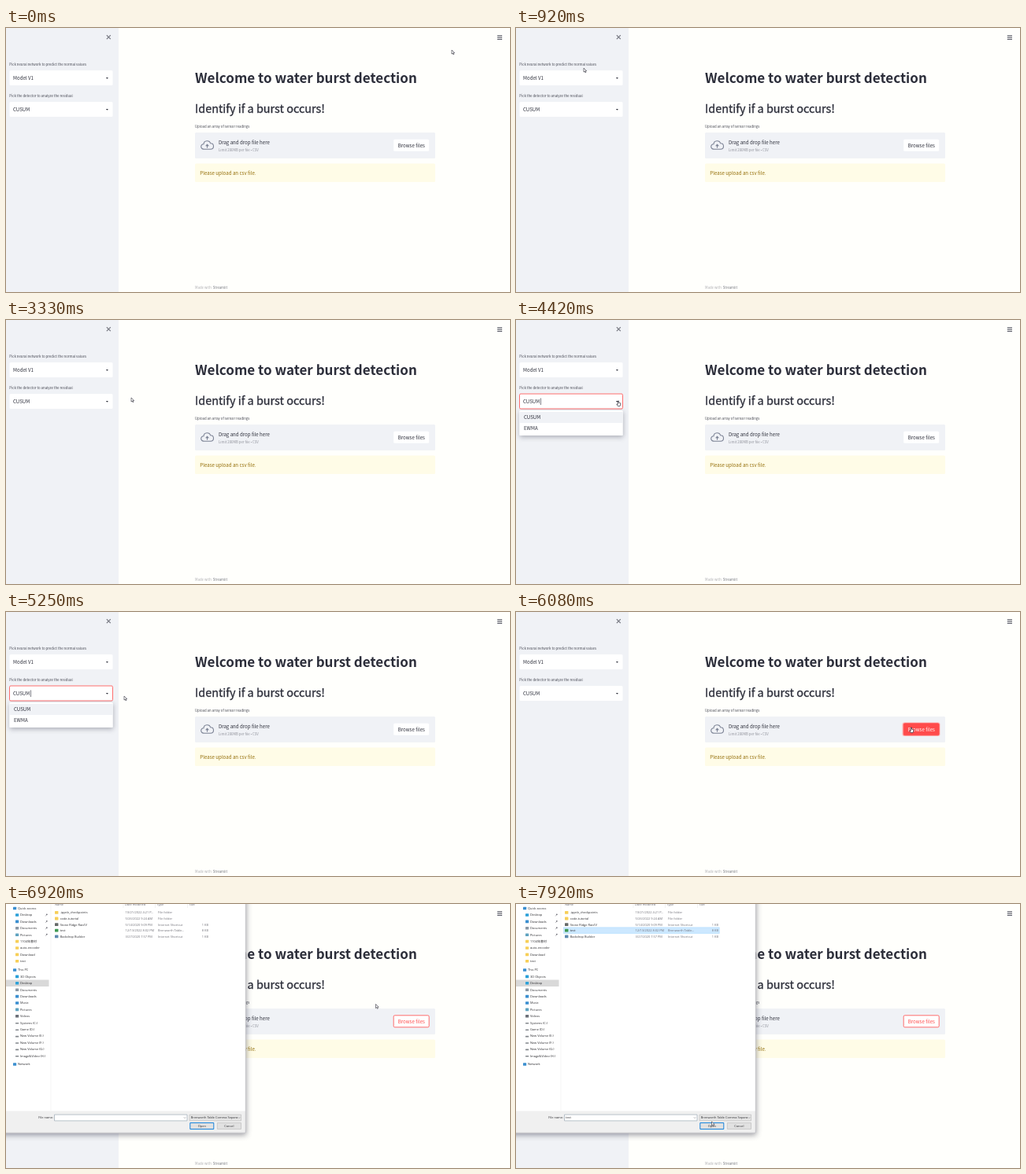
An HTML page with a canvas for the animation above (8 s loop, 640 by 336 pixels).

```html
<!DOCTYPE html>
<html lang="en">
<head>
<meta charset="utf-8">
<title>Water burst detection</title>
<style>
html, body { margin: 0; width: 100%; height: 100%; overflow: hidden; background: #fffffc; }
canvas { display: block; width: 640px; height: 336px; }
</style>
</head>
<body>
<canvas id="stage"></canvas>
<script>
const canvas = document.getElementById('stage');
const ctx = canvas.getContext('2d');
const ratio = window.devicePixelRatio || 1;
canvas.width = 640 * ratio;
canvas.height = 336 * ratio;

const LOOP = 8000;
const BEATS = [0, 80, 250, 330, 420];
const SANS = '"Noto Sans CJK JP", "Noto Sans CJK SC", "Noto Sans CJK", sans-serif';
const UI = '"Open Sans", "Noto Sans CJK JP", sans-serif';
const PAGE = '#fffffc', PANEL = '#f0f2f6', WHITE = '#ffffff', INK = '#2b2d39', RED = '#ff4b4b';
const LABEL = '#484a55', SLATE = '#7b8294';

// Cursor stops: time, x, y of the tip
const PATH = [
  [0, 566, 28], [250, 566, 28], [920, 86, 51], [1080, 126, 62], [1580, 128, 62],
  [2580, 128, 62], [3250, 159, 98], [3420, 159, 100], [4080, 130, 103], [5080, 130, 103],
  [5250, 150, 107], [5580, 456, 149], [5920, 502, 147], [6250, 502, 147], [6580, 469.5, 127.5],
  [7250, 469.5, 127.5], [7580, 88, 34], [7750, 90, 36], [7920, 248.5, 277], [8000, 248.5, 277]
];

function cursorAt(t) {
  let i = 1;
  while (PATH[i][0] < t) i++;
  const [t0, x0, y0] = PATH[i - 1], [t1, x1, y1] = PATH[i];
  const k = (t - t0) / (t1 - t0);
  const e = k * k * (3 - 2 * k);
  return [x0 + (x1 - x0) * e, y0 + (y1 - y0) * e];
}

function rect(x, y, w, h, fill, r = 0, stroke, lw = 0.8) {
  ctx.beginPath();
  ctx.roundRect(x, y, w, h, r);
  if (fill) { ctx.fillStyle = fill; ctx.fill(); }
  if (stroke) { ctx.strokeStyle = stroke; ctx.lineWidth = lw; ctx.stroke(); }
}

// y is the middle of the capital letters
function text(s, x, y, size, color = INK, opt = {}) {
  const base = y + size * 0.365;
  ctx.font = `${opt.weight || 400} ${size}px ${opt.font || SANS}`;
  ctx.textAlign = opt.align || 'left';
  ctx.fillStyle = color;
  ctx.fillText(s, x, base);
  if (opt.thicken) {
    ctx.strokeStyle = color;
    ctx.lineWidth = opt.thicken;
    ctx.strokeText(s, x, base);
  }
}

function line(points, color, lw = 0.8) {
  ctx.beginPath();
  points.forEach(([x, y]) => ctx.lineTo(x, y));
  ctx.strokeStyle = color;
  ctx.lineWidth = lw;
  ctx.stroke();
}

function poly(points, fill, stroke, lw = 0.6) {
  ctx.beginPath();
  points.forEach(([x, y]) => ctx.lineTo(x, y));
  ctx.closePath();
  ctx.fillStyle = fill;
  ctx.fill();
  if (stroke) { ctx.strokeStyle = stroke; ctx.lineWidth = lw; ctx.stroke(); }
}

// Shadow around a box only, so a translucent box stays clean
function dropShadow(x, y, w, h, blur, color) {
  ctx.save();
  ctx.beginPath();
  ctx.rect(-200, -200, 1000, 800);
  ctx.rect(x, y, w, h);
  ctx.clip('evenodd');
  ctx.shadowBlur = blur * ratio;
  ctx.shadowOffsetY = 2 * ratio;
  ctx.shadowColor = color;
  rect(x, y, w, h, WHITE);
  ctx.restore();
}

function select(value, y, open, caret) {
  rect(4.5, y, 131, 19, WHITE, 1.5, open ? RED : null);
  text(value, 9, y + 9.8, 6.12);
  poly([[126.9, y + 9], [129.9, y + 9], [128.4, y + 10.8]], INK);
  if (open && caret) line([[31.5, y + 5.5], [31.5, y + 14]], INK, 0.6);
}

function menu(items, y) {
  const h = items.length * 14 + 4;
  dropShadow(4.5, y, 131, h, 6, 'rgba(40,42,60,.35)');
  rect(4.5, y, 131, h, WHITE, 1.5);
  rect(4.5, y + 2, 131, 14, PANEL);
  items.forEach((s, i) => text(s, 10, y + 9 + i * 14, 6.12));
}

function cloud() {
  ctx.beginPath();
  ctx.moveTo(252, 154.3);
  ctx.bezierCurveTo(246.5, 154.3, 246.5, 148, 251, 147.8);
  ctx.bezierCurveTo(251.3, 142.6, 258.5, 142.6, 259.6, 146.8);
  ctx.bezierCurveTo(264.8, 146.8, 264.8, 154.3, 259.6, 154.3);
  ctx.closePath();
  ctx.strokeStyle = SLATE;
  ctx.lineWidth = 1.1;
  ctx.stroke();
  line([[255.5, 152.6], [255.5, 149]], SLATE, 1.1);
  poly([[253, 150.3], [255.5, 147.6], [258, 150.3]], SLATE);
}

function browse(t) {
  const hot = t >= 5750, down = t >= 5920 && t < 6250;
  if (down) rect(490.5, 140.5, 48, 17.5, '#ffb4b4', 2.5);
  rect(492.2, 141.8, 45, 15, down ? RED : WHITE, 1.5, hot ? RED : null, 0.8);
  text('Browse files', 514.8, 149.4, 6.12, down ? WHITE : hot ? RED : INK, { align: 'center' });
}

function page(t) {
  rect(0, 0, 640, 336, PAGE);
  rect(0, 0, 143, 336, PANEL);
  line([[127.8, 9.2], [132.8, 14.2]], '#777982', 1.2);
  line([[132.8, 9.2], [127.8, 14.2]], '#777982', 1.2);
  for (let y = 9.8; y < 15; y += 2.3) line([[623.8, y], [630, y]], '#555762', 1.1);

  const first = t >= 1830 && t < 3330, second = t >= 4250 && t < 5330;
  const caret = (t - (first ? 1830 : 4250)) % 1000 < 500;
  text('Pick neural network to predict the normal values', 4.3, 46.5, 4.34, LABEL);
  text('Pick the detector to analyze the residual', 4.3, 86, 4.34, LABEL);
  select('Model V1', 54, first, caret);
  select('CUSUM', 94, second, caret);

  text('Welcome to water burst detection', 240, 63.5, 17.02, INK, { weight: 700 });
  text('Identify if a burst occurs!', 240, 102.3, 14.42, INK, { thicken: 0.3 });
  text('Upload an array of sensor readings', 240, 125.2, 4.3, LABEL);
  rect(240, 133, 305, 33, PANEL, 1.5);
  cloud();
  text('Drag and drop file here', 270, 145.8, 6.12);
  text('Limit 200MB per file • CSV', 270, 155.4, 4.32, '#8f919a');
  browse(t);
  rect(240, 172.5, 305, 23.5, '#fffce7', 1.5);
  text('Please upload an csv file.', 246.3, 184.6, 6.15, '#926c05');
  text('Made with ', 240, 330.2, 4.3, '#adadb2');
  text('Streamlit', 262.7, 330.2, 4.3, '#777982');

  if (first) menu(['Model V1', 'Model V2', 'Model V3'], 75);
  if (second) menu(['CUSUM', 'EWMA'], 115);
}

const FOLDER = '#f7cf58', DISK = '#83878c', BLUE = '#3b8fd0';
const PLACES = [
  ['Quick access', 5.5, BLUE], ['Desktop', 14, '#2ba0d8'], ['Downloads', 22.4, BLUE],
  ['Documents', 30.8, '#8b98a5'], ['Pictures', 39.2, '#5fa3c0'], ['1104年書材', 47.6, FOLDER],
  ['auto-encoder', 56, FOLDER], ['Download', 64.4, FOLDER], ['test', 72.8, FOLDER],
  ['This PC', 84, BLUE], ['3D Objects', 92.4, '#2ba0d8'], ['Desktop', 100.8, '#2ba0d8'],
  ['Documents', 109.2, '#8b98a5'], ['Downloads', 117.6, BLUE], ['Music', 126, BLUE],
  ['Pictures', 134.4, '#5fa3c0'], ['Videos', 142.8, '#6c7078'], ['Systems (C:)', 151.2, DISK],
  ['Game (D:)', 159.6, DISK], ['New Volume (E:)', 168, DISK], ['New Volume (F:)', 176.4, DISK],
  ['New Volume (G:)', 184.8, DISK], ['Image&Video (H:)', 193.2, DISK], ['Network', 204, BLUE]
];
const FILES = [
  ['.ipynb_checkpoints', '10/21/2022 4:21 P...', 'File folder', '', FOLDER],
  ['code-tutorial', '5/26/2022 9:24 AM', 'File folder', '', FOLDER],
  ['Stone Ridge Raid V', '5/14/2020 9:09 PM', 'Internet Shortcut', '1 KB', '#666a68'],
  ['test', '12/13/2022 8:02 PM', 'Brenworth Table...', '8 KB', '#3f9a52'],
  ['Backdrop Builder', '3/27/2020 7:57 PM', 'Internet Shortcut', '1 KB', '#5d8ab0']
];

function small(s, x, y, color = '#2c2c30', align = 'left') {
  text(s, x, y, 3.95, color, { font: UI, align });
}

function chevron(x, y) {
  line([[x - 1.2, y - 0.6], [x, y + 0.6], [x + 1.2, y - 0.6]], '#66666c', 0.5);
}

function dialog(t) {
  const hover = t >= 7500, picked = t >= 7580, gray = '#707078';
  ctx.save();
  if (t < 6750) {
    const size = 0.986;
    ctx.globalAlpha = t < 6580 ? 0.5 : 0.84;
    ctx.translate(95 * (1 - size), 76 * (1 - size));
    ctx.scale(size, size);
  }
  dropShadow(-100, -140, 404.5, 431.5, 7, 'rgba(30,30,50,.45)');
  rect(-100, -140, 404.5, 431.5, WHITE);
  rect(-100, 263.5, 404.5, 28, '#f0f0f0');
  line([[304.3, -10], [304.3, 291.3], [-10, 291.3]], '#9a9aa2', 0.6);
  rect(-2, 96.6, 56.5, 8.4, '#d9d9d9');
  line([[57, 0], [57, 263]], '#f0f0f0', 0.6);

  PLACES.forEach(([name, y, color], i) => {
    const x = i === 0 || i === 9 || i === 23 ? 9 : 12;
    const drive = color === DISK;
    rect(x, y - (drive ? 0.2 : 1.8), 4.2, drive ? 1.6 : 3.6, color, 0.5);
    small(name, x + 6, y);
    if (i > 0 && i < 5) {
      line([[50.2, y + 1.4], [52, y - 0.6]], gray, 0.6);
      rect(51, y - 1.5, 1.6, 1.6, gray, 0.6);
    }
  });

  [['Name', 62], ['Date modified', 151], ['Type', 191.5], ['Size', 232.5]].forEach(([s, x]) => {
    small(s, x, 0.5, gray);
    if (x > 62) line([[x - 2, 0], [x - 2, 5]], '#e4e4e4', 0.5);
  });
  if (hover) rect(60.3, 29.8, 198, 7.6, picked ? '#cce8ff' : '#e5f3ff', 0, picked ? '#99d1ff' : null, 0.4);
  FILES.forEach(([name, date, type, size, color], i) => {
    const y = 10.9 + i * 7.6;
    rect(62, y - 1.9, 4.4, 3.8, color, 0.5);
    small(name, 68.7, y);
    small(date, 151.5, y, gray);
    small(type, 193, y, gray);
    small(size, 257, y, gray, 'right');
  });

  small('File name:', 60, 272, '#2c2c30', 'right');
  rect(61.5, 268.1, 168.5, 7.8, WHITE, 0, '#8a9aa8', 0.6);
  if (picked) small('test', 63, 272);
  chevron(227, 272);
  rect(233, 268.1, 65.5, 7.8, '#e5e5e5', 0, '#adadad', 0.5);
  small('Brenworth Table Comma Separa', 234.8, 272);
  chevron(296, 272);
  rect(233.8, 278.5, 30, 8, '#e1e1e1', 0, '#0078d7', 0.9);
  small('Open', 248.8, 282.4, '#2c2c30', 'center');
  rect(268.3, 278.5, 30.2, 8, '#e1e1e1', 0, '#adadad', 0.5);
  small('Cancel', 283.4, 282.4, '#2c2c30', 'center');
  ctx.restore();
}

function cursor(t) {
  const [x, y] = cursorAt(t);
  const onSelect = x > 4 && x < 136 && ((y > 54 && y < 73) || (y > 94 && y < 113));
  const onButton = x > 492 && x < 537 && y > 142 && y < 157;
  ctx.save();
  ctx.translate(x, y);
  if (t < 6500 && (onSelect || onButton)) {
    poly([[-0.6, 0], [0.5, 0], [0.6, 2.2], [2.8, 2.9], [2.7, 5], [2, 6.6], [-0.7, 6.6], [-2.2, 4], [-0.6, 4.2]],
      WHITE, '#2c2c38', 0.7);
  } else {
    poly([[0, 0], [0, 5.1], [1.2, 4], [2, 5.8], [2.9, 5.4], [2.1, 3.7], [3.7, 3.6]], WHITE, '#2c2c38', 0.6);
  }
  ctx.restore();
}

function draw(t) {
  ctx.setTransform(ratio, 0, 0, ratio, 0, 0);
  page(t);
  if (t >= 6500) dialog(t);
  cursor(t);
}

function snap(t) {
  const rest = t % 500;
  return t - rest + BEATS.filter(b => b <= rest).pop();
}

const start = performance.now();
function tick() {
  draw(snap((performance.now() - start) % LOOP));
  requestAnimationFrame(tick);
}
tick();
</script>
</body>
</html>
```
